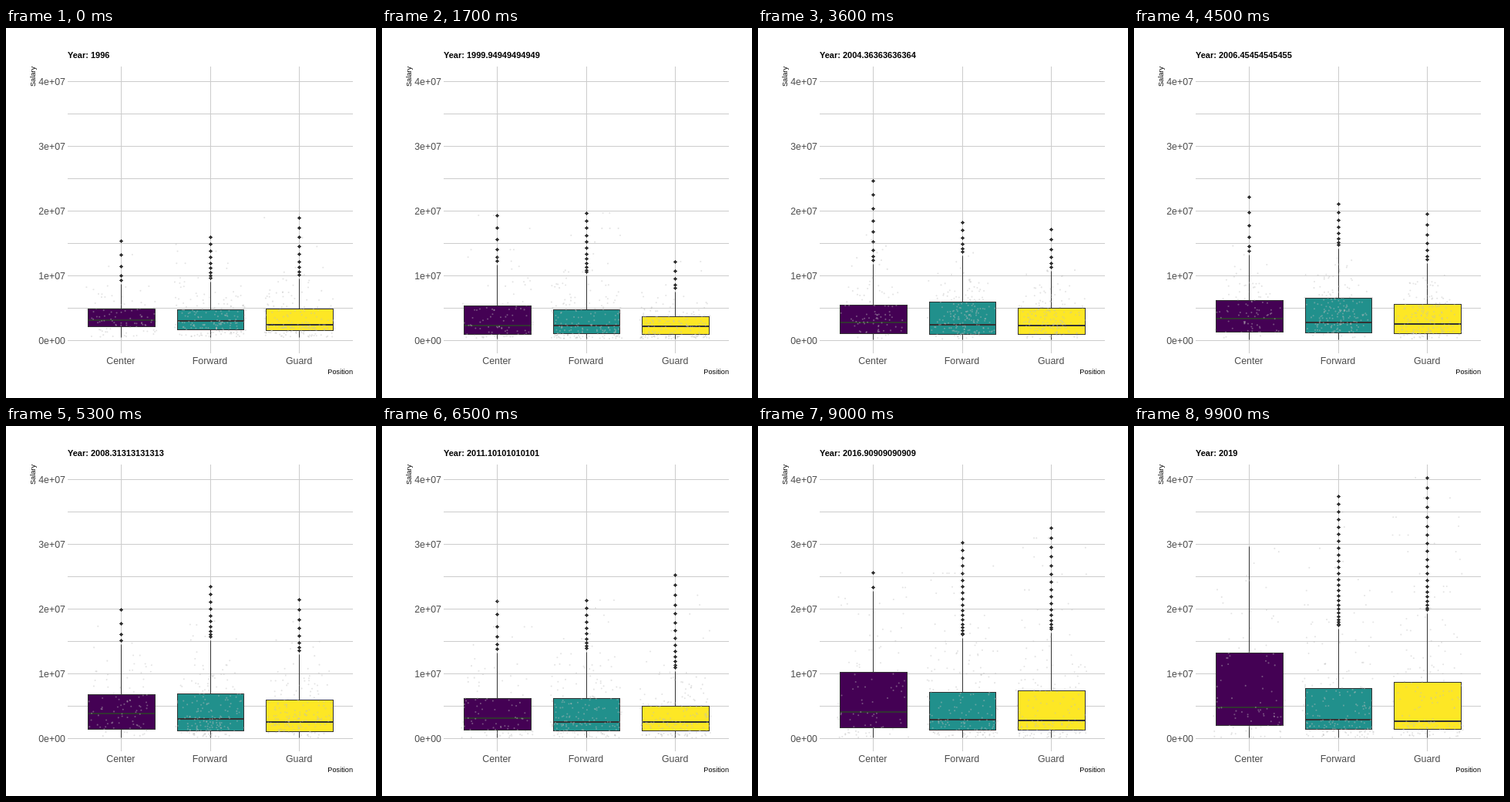
These frames come from a looping animation (480x480 px, 10000 ms). An HTML page with a canvas:

```html
<!DOCTYPE html>
<html lang="en">
<head>
<meta charset="utf-8">
<title>Salary by position</title>
<style>
  html, body { margin: 0; width: 100%; height: 100%; overflow: hidden; background: #fff; }
  canvas { display: block; }
</style>
</head>
<body>
<canvas width="480" height="480"></canvas>
<script>
const ctx = document.querySelector('canvas').getContext('2d');
const FRAMES = 100, STEP = 100, START = 1996, END = 2019;
const INK = '#333333', GRID = '#cccccc', LABEL = '#4d4d4d';
const BAND = 370 / 3.2;

// gap: mean distance between outliers; poses: [frame, Q3, median, Q1, maximum] as heights on the stage
const groups = [
  { name: 'Center', fill: '#440154', points: 95, gap: 13, poses: [
    [0, 364, 379, 387, 276], [17, 360, 386, 397, 243], [36, 359, 382, 396, 198],
    [53, 348, 373, 393, 238], [65, 353, 379, 394, 227], [81, 345, 378, 395, 219],
    [99, 294, 365, 388, 162]] },
  { name: 'Forward', fill: '#21908c', points: 190, gap: 7, poses: [
    [0, 365, 380, 391, 271], [17, 365, 386, 396, 240], [36, 355, 385, 397, 252],
    [53, 347, 380, 395, 208], [65, 353, 384, 395, 226], [81, 351, 382, 395, 212],
    [99, 340, 381, 393, 91]] },
  { name: 'Guard', fill: '#fde725', points: 175, gap: 9, poses: [
    [0, 364, 385, 392, 246], [17, 374, 387, 397, 303], [36, 363, 386, 397, 261],
    [53, 355, 384, 396, 225], [65, 363, 384, 395, 193], [81, 354, 382, 396, 198],
    [99, 332, 383, 393, 67]] }
];
groups.forEach((group, i) => group.x = 80 + BAND * (i + 0.6));

const mix = (a, b, t) => a + (b - a) * t;
const crisp = v => Math.floor(v) + 0.5;
const random = n => {
  const v = Math.sin(n * 12.9898 + 4.1) * 43758.5453;
  return v - Math.floor(v);
};

// Finds the neighbours of a frame in a sorted list and the progress between them
function between(list, frame, frameOf) {
  let k = 0;
  while (k < list.length - 2 && frame >= frameOf(list[k + 1])) k++;
  const [a, b] = [list[k], list[k + 1]];
  return [a, b, (frame - frameOf(a)) / (frameOf(b) - frameOf(a))];
}

// Whiskers reach 1.5 box heights; outliers thin out towards the maximum
function statsAt({ poses, gap }, frame) {
  const [a, b, t] = between(poses, frame, pose => pose[0]);
  const [, q3, median, q1, max] = a.map((v, i) => mix(v, b[i], t));
  const top = q3 - 1.5 * (q1 - q3) + 3;
  const bottom = Math.min(404.5, 401 + frame / 8);
  const base = top - 5;
  const count = Math.max(0, Math.round((base - max) / gap) + 1);
  const out = Array.from({ length: count }, (_, i) =>
    mix(max, base, 1 - (1 - i / Math.max(1, count - 1)) ** 1.5));
  return { box: [top, q3, median, q1, bottom], out };
}

// Height of a salary at rank u of the distribution that the box describes
function quantile({ box, out }, u, n) {
  const rank = Math.floor((1 - u) * n);
  if (rank < out.length) return out[rank];
  const v = u * n / (n - out.length) * 4;
  const part = Math.min(3, Math.floor(v));
  const f = Math.min(1, v - part);
  return mix(box[4 - part], box[3 - part], part === 3 ? f ** 1.5 : f);
}

// One random scatter per year; neighbouring years are blended
const scatter = [];
for (let year = START; year <= END; year++) {
  const frame = Math.round((year - START) * (FRAMES - 1) / (END - START));
  const points = groups.flatMap((group, g) => {
    const stats = statsAt(group, frame);
    return Array.from({ length: group.points }, (_, i) => {
      const seed = (year - START) * 1000 + g * 300 + i;
      return {
        x: group.x + (random(seed) - 0.5) * BAND * 0.8,
        y: quantile(stats, random(seed + 50000.5), group.points)
      };
    });
  });
  scatter.push({ frame, points });
}

function line(x1, y1, x2, y2, color, width = 1) {
  ctx.strokeStyle = color;
  ctx.lineWidth = width;
  ctx.beginPath();
  ctx.moveTo(x1, y1);
  ctx.lineTo(x2, y2);
  ctx.stroke();
}

function text(str, x, y, size, align, color = '#000', weight = '') {
  ctx.font = `${weight} ${size}px "Liberation Sans", Arial, sans-serif`;
  ctx.textAlign = align;
  ctx.fillStyle = color;
  ctx.fillText(str, x, y);
}

function drawAxes() {
  for (let i = 0; i < 9; i++) {
    const y = 405.5 - i * 42;
    line(80, y, 450, y, GRID);
    if (i % 2 === 0) text(`${i / 2}e+0${i ? 7 : 0}`, 77, y + 4.5, 12.4, 'right', LABEL);
  }
  for (const { name, x } of groups) {
    line(crisp(x), 50, crisp(x), 422, GRID);
    text(name, x - 0.5, 436, 12.4, 'center', LABEL);
  }
  text('Position', 450, 449, 9.2, 'right');
  ctx.save();
  ctx.translate(38, 50);
  ctx.rotate(-Math.PI / 2);
  text('Salary', 0, 0, 9.2, 'right');
  ctx.restore();
}

// Small pixel diamond
function drawOutlier(x, y) {
  ctx.fillStyle = INK;
  ctx.fillRect(x - 1, y - 1, 3, 3);
  ctx.fillRect(x - 2, y, 5, 1);
  ctx.fillRect(x, y - 2, 1, 5);
}

function drawBox({ x, fill }, { box, out }) {
  const [top, q3, median, q1, bottom] = box.map(crisp);
  const mid = crisp(x);
  const left = Math.round(x - BAND * 0.375) + 0.5;
  const right = Math.round(x + BAND * 0.375) + 0.5;
  line(mid, top, mid, q3, INK);
  line(mid, q1, mid, bottom, INK);
  for (const y of out) drawOutlier(Math.floor(x), Math.round(y - 0.5));
  ctx.fillStyle = fill;
  ctx.fillRect(left, q3, right - left, q1 - q3);
  line(left, median - 0.5, right, median - 0.5, INK, 2);
  ctx.strokeStyle = INK;
  ctx.lineWidth = 1;
  ctx.strokeRect(left, q3, right - left, q1 - q3);
}

function drawPoints(frame) {
  const [from, to, t] = between(scatter, frame, state => state.frame);
  ctx.fillStyle = 'rgba(190,190,190,0.42)';
  from.points.forEach((a, i) => {
    const b = to.points[i];
    ctx.beginPath();
    ctx.arc(mix(a.x, b.x, t), mix(a.y, b.y, t), 1.05, 0, Math.PI * 2);
    ctx.fill();
  });
}

function draw(now) {
  const frame = Math.floor(now / STEP) % FRAMES;
  const year = START + frame * (END - START) / (FRAMES - 1);
  ctx.fillStyle = '#fff';
  ctx.fillRect(0, 0, 480, 480);
  drawAxes();
  text('Year: ' + Number(year.toPrecision(15)), 80, 39, 11, 'left', '#000', 'bold');
  for (const group of groups) drawBox(group, statsAt(group, frame));
  drawPoints(frame);
}

const begin = performance.now();
function tick() {
  draw(performance.now() - begin);
  requestAnimationFrame(tick);
}
tick();
</script>
</body>
</html>
```
